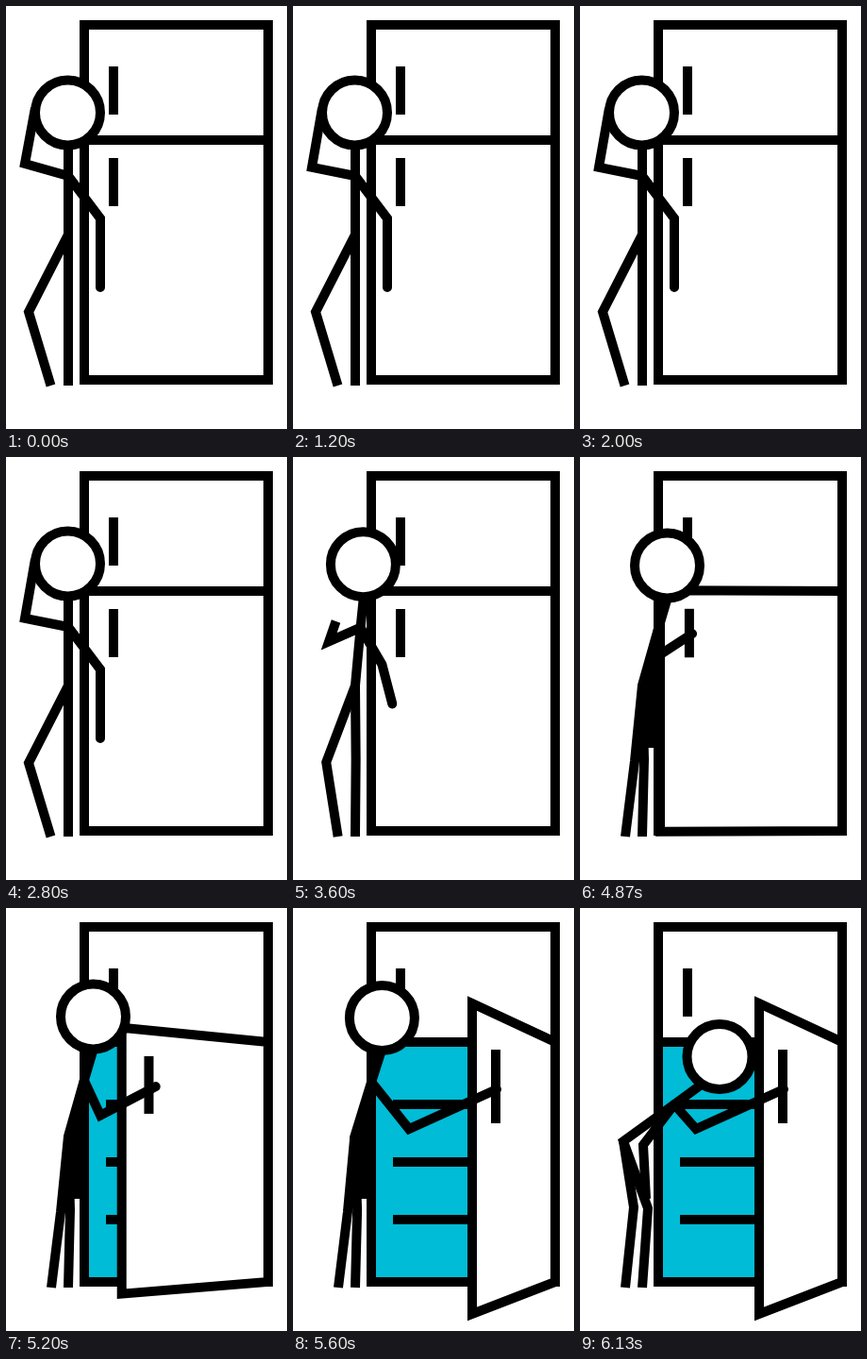
An HTML page with a canvas for the animation above (8000 ms loop, 298 by 448 pixels).

```html
<!DOCTYPE html>
<html lang="en">
<head>
<meta charset="utf-8">
<title>Opening the fridge</title>
<style>
  html, body { margin: 0; width: 100%; height: 100%; overflow: hidden; background: #fff; }
  canvas { display: block; }
</style>
</head>
<body>
<canvas id="stage" width="298" height="448"></canvas>
<script>
const ctx = document.getElementById("stage").getContext("2d");
const LOOP = 8000, FPS = 15;

// Joints of each limb as flat x, y lists
const waiting = {
  head: [65.5, 113],
  front: [66, 145, 66, 180, 66, 242, 66, 320, 66, 402],
  back: [66, 242, 24, 324, 47.5, 402],
  left: [66, 180, 20, 167, 31, 108],
  right: [66, 180, 100, 225, 100, 298]
};
const gripping = {
  head: [92.5, 115],
  front: [94, 145, 83, 182, 66, 242, 68, 320, 66, 402],
  back: [66, 242, 58, 322, 48, 402],
  left: [83, 182, 75, 245, 75, 308],
  right: [83, 182, 83, 209, 116, 187]
};
const pulling = { ...gripping, right: [83, 184, 123, 234, 216, 192] };
const peering = {
  head: [148, 157.5],
  front: [130, 186, 100, 208, 46, 247, 72, 318, 66, 402],
  back: [46, 247, 57, 317, 48, 402],
  left: [100, 208, 67, 251, 70, 308],
  right: [100, 208, 123, 234, 216, 192]
};

const doorShut = [83, 142, 278, 142, 278, 396, 83, 396];
const doorOpen = [190, 101, 278, 142, 278, 396, 190, 430];
const handleShut = [114, 161, 114, 212];
const handleOpen = [215, 150, 215, 228];

const mix = (a, b, k) => a.map((v, i) => v + (b[i] - v) * k);
const mixPose = (a, b, k) =>
  Object.fromEntries(Object.keys(a).map(part => [part, mix(a[part], b[part], k)]));
const span = (n, from, to) => Math.min(1, Math.max(0, (n - from) / (to - from)));
const ease = p => p * p * (3 - 2 * p);

function path(pts, { fill, cap = "butt", closed = false } = {}) {
  ctx.beginPath();
  for (let i = 0; i < pts.length; i += 2) ctx.lineTo(pts[i], pts[i + 1]);
  if (closed) ctx.closePath();
  if (fill) {
    ctx.fillStyle = fill;
    ctx.fill();
  }
  ctx.lineCap = cap;
  ctx.stroke();
}

function poseAt(n, pull) {
  if (n >= 83) return mixPose(pulling, peering, ease(span(n, 83, 92)));
  if (n >= 69) return mixPose(gripping, pulling, ease(pull ** 1.8));
  const left = [...waiting.left];
  left[3] += 1.9 * (1 - Math.cos(n * Math.PI / 6)); // scratching elbow
  return mixPose({ ...waiting, left }, gripping, ease(span(n, 49, 62)));
}

function drawFridge(open) {
  path([83, 20, 278, 20, 278, 396, 83, 396], { closed: true });
  path(doorShut, { fill: "#00bcd6", closed: true });
  for (const y of [208, 269, 330]) path([106, y, 278, y]);
  path([114, 64, 114, 115]);
  path(mix(doorShut, doorOpen, open), { fill: "#fff", closed: true });
  path(mix(handleShut, handleOpen, open));
}

function drawFigure(pose) {
  path(pose.back);
  path(pose.front);
  path(pose.left);
  path(pose.right, { cap: "round" });
  ctx.beginPath();
  ctx.arc(...pose.head, 34.5, 0, Math.PI * 2);
  ctx.fillStyle = "#fff";
  ctx.fill();
  ctx.stroke();
}

function render(now) {
  const n = Math.floor((now % LOOP) * FPS / 1000 + 0.06);
  const pull = span(n, 69, 83);
  ctx.fillStyle = "#fff";
  ctx.fillRect(0, 0, 298, 448);
  ctx.strokeStyle = "#000";
  ctx.lineWidth = 10;
  drawFridge(ease(pull ** 2));
  drawFigure(poseAt(n, pull));
}

let start;
function tick(now) {
  start ??= now;
  render(now - start);
  requestAnimationFrame(tick);
}
render(0);
requestAnimationFrame(tick);
</script>
</body>
</html>
```
